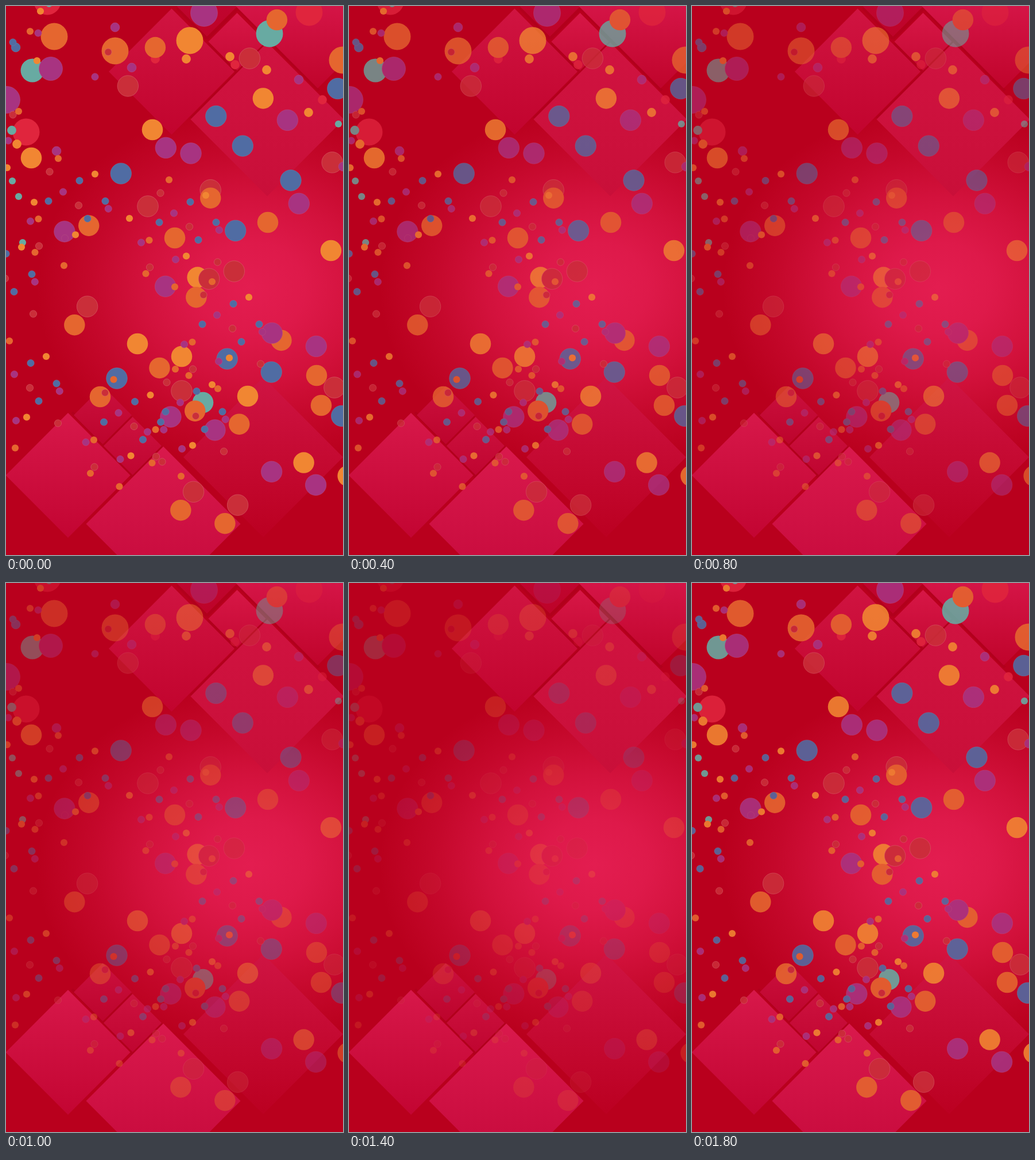
Animation of 587x954 px, one loop 2000 ms. Source, as an HTML page:

```html
<!DOCTYPE html>
<html lang="en">
<head>
<meta charset="utf-8">
<title>Confetti on red</title>
<style>
html, body { margin: 0; width: 100%; height: 100%; overflow: hidden; background: #b9001d; }
svg { display: block; width: 587px; height: 954px; }
</style>
</head>
<body>
<svg viewBox="0 0 587 954">
  <defs id="defs">
    <radialGradient id="glow" gradientUnits="userSpaceOnUse" cx="0" cy="0" r="1" gradientTransform="translate(428 490) scale(375 315)">
      <stop offset="0" stop-color="#e31d50"/>
      <stop offset=".25" stop-color="#e31d50" stop-opacity=".88"/>
      <stop offset=".5" stop-color="#e31d50" stop-opacity=".61"/>
      <stop offset=".75" stop-color="#e31d50" stop-opacity=".27"/>
      <stop offset="1" stop-color="#e31d50" stop-opacity="0"/>
    </radialGradient>
  </defs>
  <rect width="587" height="954" fill="#b9001d"/>
  <rect width="587" height="954" fill="url(#glow)"/>
  <path d="M350 57L298 3M350 57L404 4L545 147M455 64L322 195M352 65L402 116M115 706L219 815M172 762L220 714M217 819L272 765"
    fill="none" stroke="#ae001c" stroke-width="5" opacity=".6"/>
  <g id="tiles"></g>
  <g id="dots"></g>
</svg>
<script>
const NS = 'http://www.w3.org/2000/svg';
const $ = id => document.getElementById(id);
const LOOP = 2000, STEP = 200;

function add(parent, tag, attrs) {
  const el = document.createElementNS(NS, tag);
  for (const k in attrs) el.setAttribute(k, attrs[k]);
  return parent.appendChild(el);
}

// A square standing on its corner, shaded from top to bottom.
function tile(x, y, half, top, bottom) {
  const id = 'shade' + $('tiles').childElementCount;
  const grad = add($('defs'), 'linearGradient', { id, x1: 0, y1: 0, x2: 0, y2: 1 });
  add(grad, 'stop', { offset: 0, 'stop-color': top });
  add(grad, 'stop', { offset: 1, 'stop-color': bottom });
  const d = `M${x} ${y - half}l${half} ${half}l${-half} ${half}l${-half} ${-half}z`;
  add($('tiles'), 'path', { d, fill: `url(#${id})` });
}

tile(350, 1, 52, '#c30734', '#bd0329');
tile(543, -3, 146, '#ea2663', '#c0042b');
tile(288.5, 114, 109.5, '#d01441', '#c2042e');
tile(402.5, 62, 50, '#d71746', '#c60934');
tile(455, 197, 133.5, '#d01340', '#c90f39');
tile(448, 784, 139, '#cf1443', '#bb0021');
tile(168.5, 711, 50.5, '#cb103e', '#bd042c');
tile(220.5, 764.5, 50.5, '#cd123f', '#c00530');
tile(108, 815.5, 108.5, '#d7184a', '#c30532');
tile(274, 900, 134.5, '#d9194c', '#c4083a');

const RED = '#e0253d', TEAL = '#68aaa2', PURPLE = '#a83381', BLUE = '#506ca3',
  BRICK = '#ca2e39', ORANGE = '#e5662f', AMBER = '#f18632';
const RIMS = { [BRICK]: '#d9646c', [PURPLE]: '#b64c83', [BLUE]: '#6a80a4' };
const SMALL = 6.1, MID = 7.9, LARGE = 18.3, HUGE = 23.5;

function dots(fill, r, ...xy) {
  for (let i = 0; i < xy.length; i += 2)
    add($('dots'), 'circle', { cx: xy[i], cy: xy[i + 1], r, fill, stroke: RIMS[fill] || 'none', 'stroke-width': .6 });
}

// One handful of confetti, thrown again at several places and two sizes.
const HANDFUL = {
  a: [BRICK, -46.5, 7.5], b: [BRICK, -97, -51], c: [BRICK, -115.5, 78], d: [BRICK, 2.5, 69],
  e: [AMBER, -18, -47], f: [AMBER, -52, 58.5],
  g: [ORANGE, -82, -74], h: [ORANGE, -116.5, 31], i: [ORANGE, -122.5, 89], j: [ORANGE, -72, 112],
  k: [BLUE, 0, 0], l: [BLUE, -45, -35.5], m: [BLUE, -99, 0], n: [BLUE, -31, 30.5],
  o: [PURPLE, 5.3, 13.3], p: [PURPLE, -73.5, -16], q: [PURPLE, -130.5, 35], r: [PURPLE, -70.5, 64.5]
};

function handful(x, y, scale = 1, degrees = 0, skip = '') {
  const angle = degrees * Math.PI / 180;
  const c = Math.cos(angle) * scale, s = Math.sin(angle) * scale;
  for (const key in HANDFUL) {
    if (skip.includes(key)) continue;
    const [fill, dx, dy] = HANDFUL[key];
    dots(fill, SMALL * scale, x + dx * c - dy * s, y + dx * s + dy * c);
  }
}
const bigHandful = (x, y, skip) => handful(x, y, 2.99, 2.3, skip);

// Loose dots
dots(RED, HUGE, 72, -8, 528, 11, 35, 219);
dots(TEAL, HUGE, 459, 48);
dots(TEAL, 20.5, 46, 112);
dots(TEAL, LARGE, 343, 689);
dots(ORANGE, HUGE, 84, 53, 190, 78, 586, 94);
dots(PURPLE, HUGE, 345, 12, 1, 163);
dots(PURPLE, 20.5, 78, 109);
dots(AMBER, HUGE, 320, 60);
dots(AMBER, LARGE, 255, 215, 44, 264, 566, 425, 229, 587, 306, 609, 421, 678);
dots(BRICK, LARGE, 247, 348, 306, 669, 572, 663);
dots(ORANGE, LARGE, 294, 403, 456, 376, 541, 642, 164, 679, 549, 694);
dots(BLUE, LARGE, 193, 647);
dots(PURPLE, LARGE, 322, 256);

dots(RED, MID, 260, 92, 399, 102, 551, 163);
bigHandful(496, 303, 'd');
bigHandful(708, 255, 'fqr');
bigHandful(681, 625, 'agjl');
bigHandful(758, 648, 'bg');

dots(PURPLE, MID, 190, 37, 219, 107, 510, 128, 88, 252, 587, 279);
dots(AMBER, MID, 314, 92, 390, 88, 454, 111, 19, 240, 527, 185);
dots(BLUE, MID, 17, 72);
dots(TEAL, MID, 10, 216);
dots(BLUE, SMALL, 12, 63);
dots(PURPLE, SMALL, 56, 47, 155, 123, 4, 234);
dots(BRICK, SMALL, 178, 80, 12, 189);
dots(ORANGE, SMALL, 42, 44, 22, 183);
dots(AMBER, SMALL, 60, 9, 54, 95, 2, 281, 49, 341, 215, 369);
dots(TEAL, SMALL, 75, -4, 11, 304, 22, 331, 579, 205, 29, 411);

handful(173, 339, 1, 0, 'd');
handful(366, 376);
handful(441, 553);
handful(45, 466);
handful(88, 656);
handful(269.5, 723);
handful(377, 705);

// The dots dim in steps; the last step jumps back to nearly full.
function draw(ms) {
  const step = Math.floor(ms % LOOP / STEP);
  const dim = step === 9 ? 1 : step;
  $('dots').setAttribute('opacity', (1 - .11 * dim).toFixed(2));
}

const start = performance.now();
function tick() {
  draw(performance.now() - start);
  requestAnimationFrame(tick);
}
draw(0);
requestAnimationFrame(tick);
</script>
</body>
</html>
```
